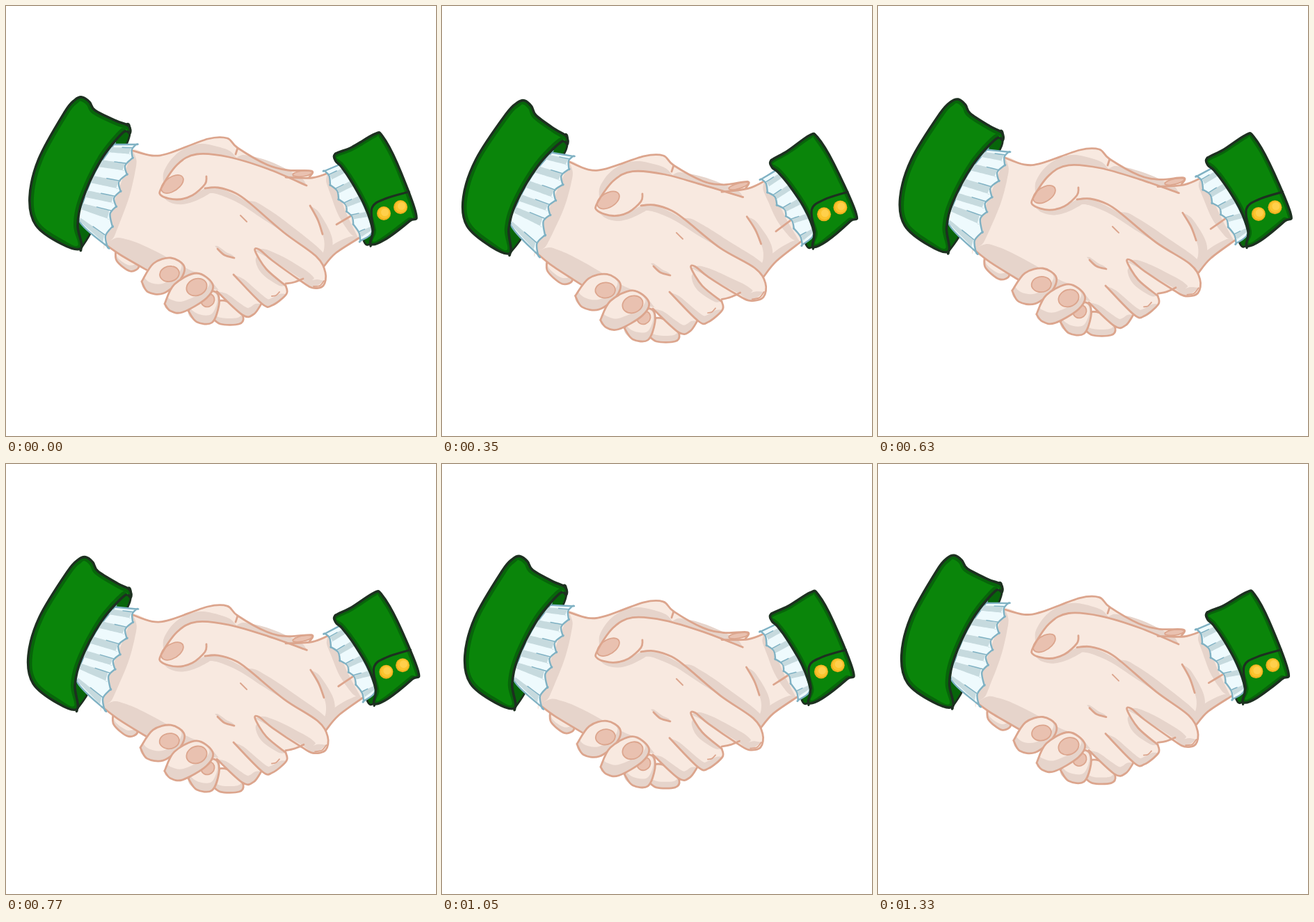
An HTML page that plays this animation: 618x618 px, repeating every 1.4 s.

```html
<!DOCTYPE html>
<html lang="en">
<head>
<meta charset="utf-8">
<title>Handshake</title>
<style>
html, body { margin: 0; width: 100%; height: 100%; overflow: hidden; background: #fff; }
svg { display: block; width: 100vw; height: 100vh; }
path { stroke-linejoin: round; stroke-linecap: round; }
</style>
</head>
<body>
<svg id="stage" viewBox="0 0 618 618"></svg>
<script>
const SKIN = '#f8e9e0', SHADE = '#e6d4cb', LINE = '#dca58d', NAIL = '#e9c1b0';
const GREEN = '#0a850a', DARK = '#07650a', INK = '#1d3020';
const LACE = '#eefafd', FOLD = '#c6dade', TRIM = '#7fb1c3';
const STEP = 70, STEPS = 20;

const stage = document.getElementById('stage');
const parts = [];

// ---- geometry ----

// Points are "x,y"; a trailing "!" makes a sharp corner.
function parse(text) {
  return text.trim().split(/\s+/).flatMap(word => {
    const p = word.replace('!', '').split(',').map(Number);
    return word.endsWith('!') ? [p, p] : [p];
  });
}

const corner = p => [p, p];
const mix = (a, b, u) => a.map((v, i) => v + (b[i] - v) * u);

function ease(a, b, x) {
  const u = Math.min(1, Math.max(0, (x - a) / (b - a)));
  return u * u * (3 - 2 * u);
}

function neighbour(pts, closed) {
  const n = pts.length;
  return i => pts[closed ? (i + n) % n : Math.max(0, Math.min(n - 1, i))];
}

// Moves every point sideways: to the right of the direction of travel.
function offset(pts, closed, dist) {
  const at = neighbour(pts, closed);
  return pts.map(([x, y], i) => {
    const a = at(i - 1), b = at(i + 1);
    const dx = b[0] - a[0], dy = b[1] - a[1];
    const k = dist(i / (pts.length - 1)) / (Math.hypot(dx, dy) || 1);
    return [x - dy * k, y + dx * k];
  });
}

// Place at share u of a smooth line.
function along(pts, u) {
  const at = neighbour(pts, false);
  const s = u * (pts.length - 1), i = Math.min(pts.length - 2, Math.floor(s)), t = s - i;
  return [0, 1].map(k => {
    const [a, b, c, d] = [-1, 0, 1, 2].map(j => at(i + j)[k]);
    return b + t / 2 * (c - a + t * (2 * a - 5 * b + 4 * c - d + t * (3 * (b - c) + d - a)));
  });
}

function trace(pts, closed) {
  const at = neighbour(pts, closed);
  let d = 'M' + pts[0].map(v => v.toFixed(1));
  for (let i = 0; i < pts.length - (closed ? 0 : 1); i++) {
    const [a, b, c, e] = [-1, 0, 1, 2].map(j => at(i + j));
    const xy = [0, 1];
    const out = xy.map(k => b[k] + (c[k] - a[k]) / 6);
    const back = xy.map(k => c[k] - (e[k] - b[k]) / 6);
    d += 'C' + [...out, ...back, ...c].map(v => v.toFixed(1)).join(' ');
  }
  return closed ? d + 'Z' : d;
}

// ---- drawing ----

function add(tag, attrs) {
  const el = document.createElementNS('http://www.w3.org/2000/svg', tag);
  for (const k in attrs) el.setAttribute(k, attrs[k]);
  return stage.appendChild(el);
}

function draw(points, closed, fill, stroke = 'none', width = 2.8) {
  const pts = typeof points === 'string' ? parse(points) : points;
  parts.push({ el: add('path', { fill, stroke, 'stroke-width': width }), pts, closed });
}

const shape = (points, fill, stroke, width) => draw(points, true, fill, stroke, width);
const line = (points, stroke = LINE, width) => draw(points, false, 'none', stroke, width);

// Soft shadow beside a line, tapered to both ends.
function shadow(text, width) {
  const pts = parse(text);
  const rail = Array.from({ length: 11 }, (_, i) => along(pts, i / 10));
  const far = offset(rail, false, u => width * Math.sqrt(Math.sin(Math.PI * Math.min(u, .9999))));
  shape([...rail, ...far.reverse()], SHADE);
}

function nail(x, y, rx, ry, tilt) {
  const c = Math.cos(tilt), s = Math.sin(tilt);
  const pts = Array.from({ length: 8 }, (_, i) => {
    const a = (i + .5) * Math.PI / 4, u = rx * Math.cos(a), v = ry * Math.sin(a);
    return [x + u * c - v * s, y + u * s + v * c];
  });
  shape(pts, NAIL, LINE, 1.8);
}

// A fingertip lit from above.
function finger(text) {
  const pts = parse(text);
  const mid = pts.reduce((sum, p) => sum + p[0], 0) / pts.length;
  const top = Math.min(...pts.map(p => p[1]));
  shape(pts, SHADE);
  shape(pts.map(([x, y]) => [mid + (x - mid) * .86, top + 1 + (y - top) * .7]), SKIN);
  line([...pts, pts[0]]);
}

function cuff(text, rim) {
  const pts = parse(text);
  shape(pts, DARK, INK, 3.6);
  shape(offset(pts, true, () => rim), GREEN);
}

// Pleated frill between a sleeve rim and a wavy edge.
function lace(rimText, edgeText, pleats, width) {
  const rim = parse(rimText), edge = parse(edgeText);
  let seed = 5;
  const rand = () => (seed = seed * 16807 % 2147483647) / 2147483647;
  const waves = pleats * 2;
  const hem = Array.from({ length: waves + 1 }, (_, i) => {
    const reach = i % 2 ? .86 + .06 * rand() : 1 + .06 * rand();
    return mix(along(rim, i / waves), along(edge, i / waves), reach);
  });
  const frill = [...corner(rim[0]), ...hem.flatMap((p, i) => i % 2 ? [p] : corner(p)), ...rim.slice().reverse()];
  shape(frill, LACE, TRIM, 2.4);
  for (let i = 0; i < pleats; i++) {
    const u = (i + .3 + .2 * rand()) / pleats, v = u + width / pleats;
    const a = along(rim, u), b = along(edge, u), c = along(edge, v), d = along(rim, v);
    shape([a, mix(a, b, .85), mix(d, c, .85), d].flatMap(corner), FOLD);
    line([mix(a, b, .45), mix(a, b, .9)], TRIM, 1.4);
  }
}

function button(x, y) {
  for (const [r, fill] of [[10, '#eeb01f'], [8.3, '#fbc42e'], [5.5, '#ffd04b']]) {
    const lift = (10 - r) / 3;
    parts.push({ el: add('circle', { r, fill }), dot: [x + lift, y - lift] });
  }
}

// ---- the picture ----

const TOP = '179,207 210,215 236,211 290,191 318,190 333,204 375,228 405,236 439,237 436,246';
const HEEL = '205,381 165,358 142,342';
const WRIST = '508,333 474,355 457,374';
const POINTER = '459,383 456,402 440,405 425,396';
const FISTS = '403,414 383,430 368,428 356,443 340,444 303,410';

// Sleeve linings
shape('172,171 178,183 172,202 150,250 125,319 108,348! 103,315 136,222', DARK, INK);
shape('474,212 480,232 500,275 514,337 524,342! 530,300 500,240', DARK, INK);

// Fingers behind the palm
finger('158,350 159,366 178,381 191,374 180,355');
finger('295,446 306,424 330,430 341,447 335,457 308,457');
finger('262,438 286,412 303,412 306,430 296,455 274,454');
nail(290, 423, 10, 9, -.7);

shape(`${TOP}! 465,240! 485,232 520,300 ${WRIST} ${POINTER}! 402,400! ${FISTS} 260,402 ${HEEL}! 150,240`, SKIN);

shadow('142,342 150,300 165,255 182,208', 18);
shadow('142,342 165,358 205,381 250,400 305,408', -30);
shadow('226,254 247,227 274,213 300,213 331,218', -14);
shadow('331,218 376,234 432,258', -11);
shadow('224,273 246,278 268,272 286,262 305,261 350,284 400,326', 10);
shadow('345,280 372,303 400,326 446,361 457,374', -14);
shadow('437,287 455,328 457,350 450,364', -12);
shadow('462,241 478,270 490,300 506,333', 12);
shadow(WRIST, 12);
shadow('358,352 383,366 425,393 440,405 457,395', -14);
shadow('362,358 374,378 402,402', 9);
shadow('327,386 368,428 383,430 403,414', -11);
shadow('303,410 340,444 356,443 367,428', -13);
shadow('300,345 314,358 328,362', -5);

nail(239, 256, 18, 10, -.6);
nail(426, 241, 14, 4, -.12);

line(TOP);
line('333,204 330,213');
line('288,245 286,256 268,272 246,278 224,273 223,262 246,228 274,213 320,217 376,234 432,258');
line('402,246 440,247 466,239');
line(`286,262 305,261 330,269 350,283 400,326 446,360 ${POINTER} 383,366 364,350 358,352 374,378 402,402`);
line('402,402 403,414 383,430 368,428 327,386');
line('367,428 356,443 340,444 303,410');
line('402,399 414,397 427,392');
line('442,403 451,402 457,395', LINE, 1.8);
line('382,417 388,416 393,411', LINE, 1.8);
line('437,287 448,307 455,328');
line('475,314 497,301');
line('304,349 314,358 328,362');
line('337,301 346,310', LINE, 2);
line(WRIST);
line(HEEL);

finger('195,396 212,370 237,362 256,374 250,394 226,413 204,411');
nail(235, 385, 14, 11, -.2);
finger('228,428 242,400 274,384 297,400 288,420 254,440 236,438');
nail(274, 404, 15, 12, -.4);

lace('155,199 130,235 112,278 106,310', '187,199 176,230 164,266 154,300 145,345', 6, .45);
lace('484,226 500,258 518,295 526,325', '458,237 470,262 485,287 497,308 510,337', 5, .35);

cuff('109,131 120,138 128,150 158,165 176,172 178,183 168,182 136,222 110,278 103,315 108,348 80,342 43,315 34,275 47,220 84,153 99,135', 6);
cuff('473,213 497,203 530,184 541,187 562,226 589,298 580,309 544,336 524,342 527,322 516,288 497,253 482,231 474,223', 5);
line('528,322 526,290 545,277 579,267', INK, 3.2);
button(543, 298);
button(567, 289);

// ---- motion ----

// Quick dip, then a slow wavering rise; 1 is a dip of about 24 pixels.
function dip(step) {
  const wave = 30 + 2 * Math.sin((step - 3) * Math.PI / 4);
  return wave * (1 - step / STEPS) * Math.min(1, step / 4) / 24;
}

// Cuffs turn about the forearms, hands sink between them.
function bend([x, y], k) {
  const left = 1 - ease(100, 240, x), right = ease(400, 520, x);
  const turn = -.092 * (y - 238) * left + .07 * (y - 212) * right;
  const side = (x - 315) * (1 - Math.max(0, y - 290) * .0014);
  const sag = 25 * Math.exp(-Math.pow(Math.abs(side) / (side < 0 ? 175 : 158), 3));
  return [x + turn * k, y + sag * k];
}

function render(ms) {
  const k = dip(Math.floor(ms / STEP) % STEPS);
  for (const { el, pts, closed, dot } of parts) {
    if (dot) {
      const [x, y] = bend(dot, k);
      el.setAttribute('cx', x);
      el.setAttribute('cy', y);
    } else {
      el.setAttribute('d', trace(pts.map(p => bend(p, k)), closed));
    }
  }
}

const start = performance.now();
function tick() {
  render(performance.now() - start);
  requestAnimationFrame(tick);
}
render(0);
requestAnimationFrame(tick);
</script>
</body>
</html>
```
